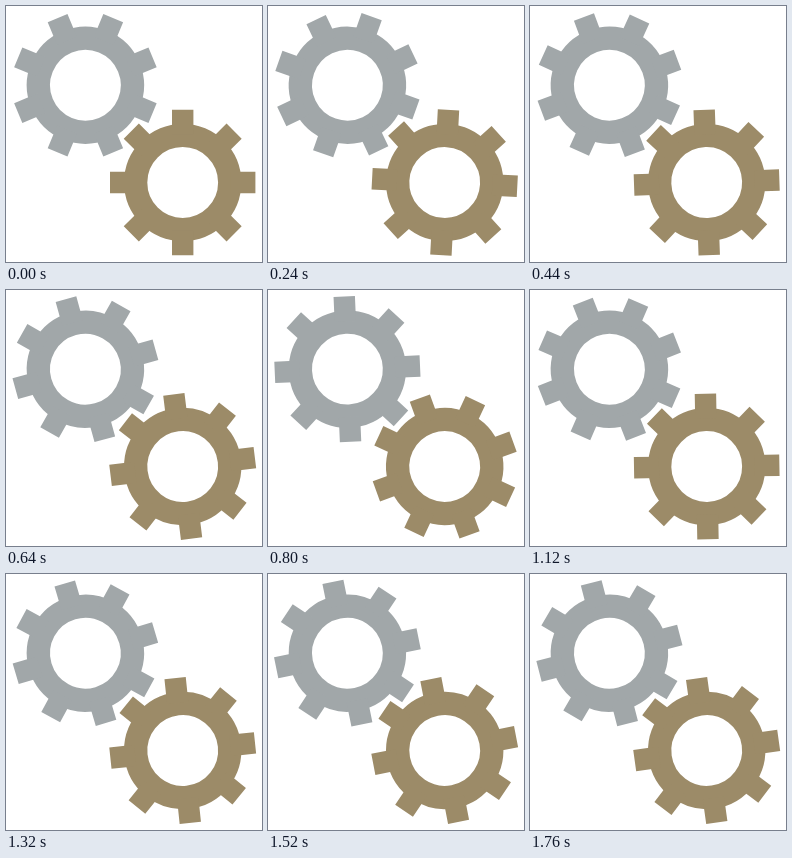
An HTML page that plays this animation: 256x256 px, repeating every 1.8 s.

```html
<!DOCTYPE html>
<html lang="en">
<head>
<meta charset="utf-8">
<title>Turning gears</title>
<style>
  html, body { margin: 0; height: 100%; overflow: hidden; background: #fff; }
  svg { display: block; width: 100%; height: 100%; }
</style>
</head>
<body>
<svg viewBox="0 0 256 256">
  <defs>
    <!-- One dashed bar gives a pair of opposite teeth -->
    <path id="bar" d="M0-72.7V72.7" stroke-width="21.4" stroke-dasharray="25 95.4"/>
    <g id="gear" fill="none">
      <circle r="47" stroke-width="23.2"/>
      <use href="#bar"/>
      <use href="#bar" transform="rotate(45)"/>
      <use href="#bar" transform="rotate(90)"/>
      <use href="#bar" transform="rotate(135)"/>
    </g>
  </defs>
  <g transform="translate(79.4 79.2)"><use id="gray" href="#gear" stroke="#a1a7a9"/></g>
  <g transform="translate(176.7 176.5)"><use id="gold" href="#gear" stroke="#9c8b68"/></g>
</svg>
<script>
  const LOOP = 1800, STEP = 40;
  const turn = (id, angle) =>
    document.getElementById(id).setAttribute('transform', `rotate(${angle})`);

  function draw() {
    // One full turn per loop, in 40 ms steps; the small offset absorbs timer rounding
    const step = Math.floor((performance.now() + 2) % LOOP / STEP);
    const angle = step * STEP / LOOP * 360;
    turn('gold', angle);
    turn('gray', 22.5 - angle);
    requestAnimationFrame(draw);
  }
  draw();
</script>
</body>
</html>
```
